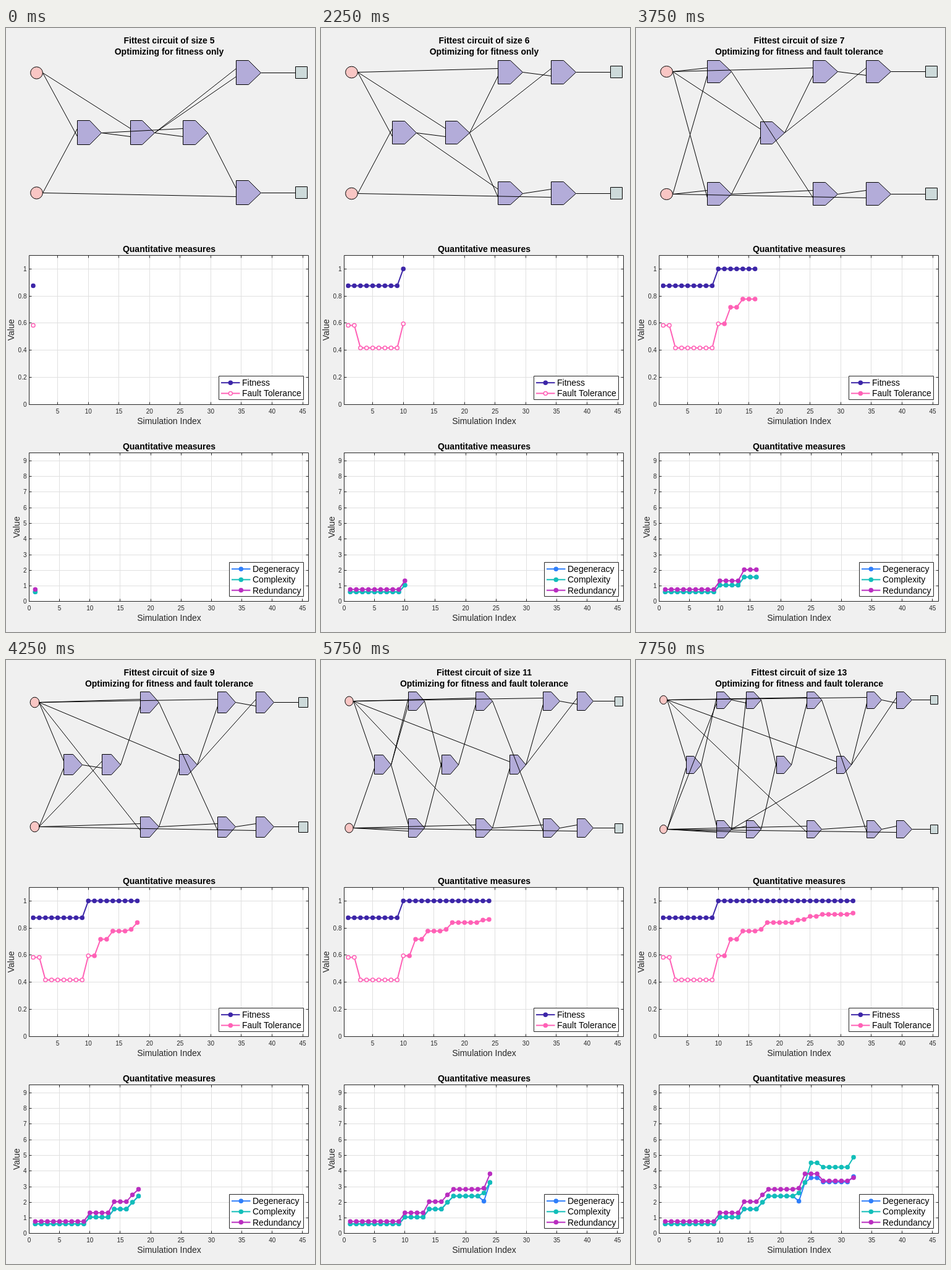
Animation of 500x976 px, one loop 8000 ms. Source, as an HTML page with a canvas:

```html
<!DOCTYPE html>
<html lang="en">
<head>
<meta charset="utf-8">
<title>Circuit evolution</title>
<style>
  html, body { margin: 0; width: 100%; height: 100%; overflow: hidden; background: #f0f0f0; }
  canvas { display: block; }
</style>
</head>
<body>
<canvas id="stage" width="500" height="976"></canvas>
<script>
const ctx = document.getElementById('stage').getContext('2d');
const STEP_MS = 250, STEPS = 32, FIRST_TOLERANT = 11;
const INK = '#262626';

// Gates between the inputs (a, b) and the output gates (P, Q), in drawing order.
const GATE_ORDER = 'IMLJKHGABDC';

// Each mutation rewires or adds gates (gate=upper source, lower source);
// measures keep their value until a later mutation changes them.
const mutations = {
  1: { wire: 'A=ba B=aA C=AB P=BB Q=Cb', fitness: 0.875, tolerance: 0.583, complexity: 0.62, redundancy: 0.78 },
  3: { wire: 'Q=CB', tolerance: 0.417 },
  10: { wire: 'D=aB P=BD Q=Cb', fitness: 1, tolerance: 0.595, complexity: 1.05, redundancy: 1.33 },
  12: { tolerance: 0.717 },
  14: { wire: 'G=ab C=AG', tolerance: 0.777, complexity: 1.57, redundancy: 2.04 },
  17: { wire: 'H=ba G=aH', tolerance: 0.79, complexity: 2, redundancy: 2.48 },
  18: { wire: 'I=ab H=bI', tolerance: 0.84, complexity: 2.4, redundancy: 2.83 },
  23: { wire: 'K=Ib H=KI', tolerance: 0.858, complexity: 2.6, degeneracy: 2.07, redundancy: 2.9 },
  24: { wire: 'J=II H=KJ', tolerance: 0.863, complexity: 3.27, redundancy: 3.82 },
  25: { wire: 'L=Ib J=LL K=Lb', tolerance: 0.886, complexity: 4.53, degeneracy: 3.57 },
  27: { wire: 'B=aL', tolerance: 0.9, complexity: 4.25, degeneracy: 3.3, redundancy: 3.37 },
  32: { wire: 'M=Ib J=LM', tolerance: 0.91, complexity: 4.88, degeneracy: 3.65, redundancy: 3.58 }
};

const history = [];
for (let step = 1, state = { net: {} }; step <= STEPS; step++) {
  const { wire = '', ...measures } = mutations[step] || {};
  const rewired = wire.split(' ').filter(Boolean).map(w => w.split('='));
  state = {
    ...state,
    // Degeneracy follows complexity unless stated.
    degeneracy: measures.complexity ?? state.degeneracy,
    ...measures,
    net: { ...state.net, ...Object.fromEntries(rewired) }
  };
  history.push(state);
}

const charts = [
  {
    top: 367.5, bottom: 608.2, x0: 34.1, dx: 9.91, dy: 219,
    firstX: 5, stepY: 0.2, maxY: 1, labelX: 13,
    legend: { x: 344.5, line: 348, text: 382 },
    series: [
      { name: 'Fitness', key: 'fitness', color: '#3d26a8' },
      { name: 'Fault Tolerance', key: 'tolerance', color: '#ff61b6', hollowUntil: FIRST_TOLERANT }
    ]
  },
  {
    top: 686.5, bottom: 926.9, x0: 37.5, dx: 9.83, dy: 25.28,
    firstX: 0, stepY: 1, maxY: 9, labelX: 22,
    legend: { x: 361.5, line: 365, text: 399 },
    series: [
      { name: 'Degeneracy', key: 'degeneracy', color: '#2f7ffa' },
      { name: 'Complexity', key: 'complexity', color: '#12beb9' },
      { name: 'Redundancy', key: 'redundancy', color: '#b92dc0' }
    ]
  }
];

const snap = v => Math.floor(v) + 0.5;

function text(str, x, y, size = 14, align = 'center', color = INK, weight = 'normal') {
  ctx.font = `${weight} ${size}px "Liberation Sans", Arial, sans-serif`;
  ctx.textAlign = align;
  ctx.fillStyle = color;
  ctx.fillText(str, x, y);
}

const heading = (str, y) => text(str, 264, y, 14, 'center', '#000', 'bold');

function paint({ stroke = '#000', width = 1, fill }) {
  if (fill) {
    ctx.fillStyle = fill;
    ctx.fill();
  }
  ctx.strokeStyle = stroke;
  ctx.lineWidth = width;
  ctx.stroke();
}

function path(points, style = {}) {
  ctx.beginPath();
  points.forEach(([x, y]) => ctx.lineTo(x, y));
  if (style.fill) ctx.closePath();
  paint(style);
}

function disc(x, y, rx, ry, style) {
  ctx.beginPath();
  ctx.ellipse(x, y, rx, ry, 0, 0, 2 * Math.PI);
  paint(style);
}

const crisp = (points, style) => path(points.map(p => p.map(snap)), style);
const box = (x, y, w, h, style) =>
  crisp([[x, y], [x + w, y], [x + w, y + h], [x, y + h], [x, y]], style);

// A gate joins the current column unless that is full or feeds the gate.
function arrange(net) {
  const columns = [['a', 'b']];
  for (const id of GATE_ORDER) {
    if (!net[id]) continue;
    const last = columns[columns.length - 1];
    if (last.length === 2 || [...net[id]].some(source => last.includes(source))) columns.push([id]);
    else last.push(id);
  }
  return [...columns, ['P', 'Q'], ['outP', 'outQ']];
}

function drawCircuit(step) {
  const { net } = history[step - 1];
  const gates = Object.keys(net);
  const columns = arrange(net);
  const gaps = columns.length - 1;
  const growth = gates.length - 5;
  const w = 5 + 172 / gaps, h = 38.9 - 1.4 * growth;
  const dx = (452 - 0.59 * w) / gaps, dy = 97 + 0.91 * growth;

  const at = {};
  columns.forEach((column, c) => column.forEach((id, i) => {
    const row = column.length === 1 ? 0 : 2 * i - 1;
    at[id] = [263.75 + (c - gaps / 2) * dx, 169.2 + row * dy];
  }));
  const outlet = id => [at[id][0] + (id === 'a' || id === 'b' ? w / 4 : w / 2), at[id][1]];

  heading(`Fittest circuit of size ${gates.length}`, 25);
  heading(`Optimizing for fitness ${step < FIRST_TOLERANT ? 'only' : 'and fault tolerance'}`, 43);

  for (const id of 'ab') disc(...at[id].map(snap), w / 4, h / 4, { fill: '#f9c6c4' });
  for (const id of 'PQ') {
    const [x, y] = at['out' + id];
    box(x - w / 4, y - h / 4, w / 2, h / 2, { fill: '#cddada' });
    crisp([outlet(id), [x - w / 4, y]]);
  }
  for (const id of gates) {
    const [x, y] = at[id], l = x - w / 2, t = y - h / 2, b = y + h / 2;
    crisp([[l, t], [x, t], [x + w / 2, y], [x, b], [l, b]], { fill: '#b3acd9' });
  }
  for (const id of gates) {
    const [x, y] = at[id];
    [...net[id]].forEach((source, i) =>
      crisp([outlet(source), [x - w / 2, y + (2 * i - 1) * h / 6]]));
  }
}

const marker = (x, y, color, hollow) =>
  disc(x, y, 3, 3, { stroke: color, width: 1.5, fill: hollow ? '#fff' : color });

function drawAxes({ top, bottom, firstX, stepY, maxY, labelX }, px, py) {
  const left = 37.5, right = 489.5, floor = snap(bottom);
  const grid = { stroke: '#e0e0e0' }, axis = { stroke: INK };
  const ticks = [];

  ctx.fillStyle = '#fff';
  ctx.fillRect(left, top, right - left, floor - top);
  for (let i = firstX; i <= 45; i += 5) {
    const x = px(i);
    crisp([[x, top], [x, floor]], grid);
    ticks.push([[x, top], [x, top + 4]], [[x, floor], [x, floor - 4]]);
    text(i, x, bottom + 14.5, 10);
  }
  for (let k = 0; k <= Math.round(maxY / stepY); k++) {
    const value = +(k * stepY).toFixed(1), y = py(value);
    crisp([[left, y], [right, y]], grid);
    ticks.push([[left, y], [left + 4, y]], [[right, y], [right - 4, y]]);
    text(value, 33.5, y + 3.5, 10, 'right');
  }
  ticks.forEach(tick => crisp(tick, axis));
  box(left, top, right - left, floor - top, axis);

  heading('Quantitative measures', top - 5.5);
  text('Simulation Index', 264, bottom + 31.5);
  ctx.save();
  ctx.translate(labelX, (top + bottom) / 2);
  ctx.rotate(-Math.PI / 2);
  text('Value', 0, 0);
  ctx.restore();
}

function drawLegend({ series, legend, bottom }, step) {
  const height = 4 + 17 * series.length, top = snap(bottom) - 8 - height;
  box(legend.x, top, 481.5 - legend.x, height, { stroke: INK, fill: '#fff' });
  series.forEach(({ name, color, hollowUntil = 0 }, i) => {
    const y = top + 10.7 + i * 17.2;
    path([[legend.line, y], [legend.line + 30.5, y]], { stroke: color, width: 2 });
    marker(legend.line + 15.3, y, color, step < hollowUntil);
    text(name, legend.text, y + 5, 14, 'left', '#000');
  });
}

function drawChart(chart, step) {
  const px = i => chart.x0 + i * chart.dx;
  const py = v => chart.bottom - v * chart.dy;
  drawAxes(chart, px, py);
  for (const { key, color, hollowUntil = 0 } of chart.series) {
    const points = history.slice(0, step).map((state, i) => [px(i + 1), py(state[key])]);
    path(points, { stroke: color, width: 2 });
    points.forEach(([x, y], i) => marker(x, y, color, i + 1 < hollowUntil));
  }
  drawLegend(chart, step);
}

function draw(now) {
  const step = Math.floor(now / STEP_MS) % STEPS + 1;
  ctx.fillStyle = '#f0f0f0';
  ctx.fillRect(0, 0, 500, 976);
  drawCircuit(step);
  charts.forEach(chart => drawChart(chart, step));
}

function tick(now) {
  draw(now);
  requestAnimationFrame(tick);
}

draw(0);
requestAnimationFrame(tick);
</script>
</body>
</html>
```
